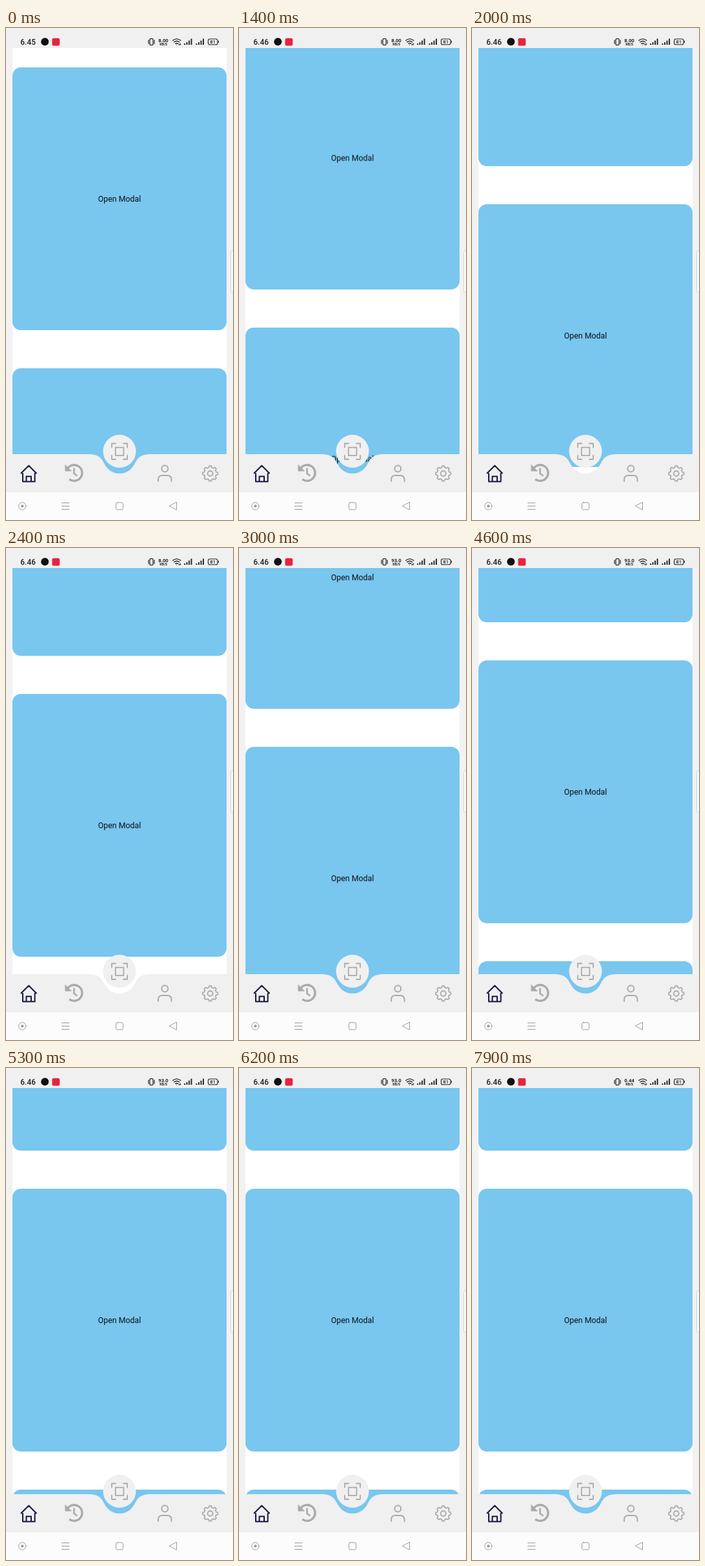
An HTML page for the animation above (8000 ms loop, 352x762 px).

```html
<!DOCTYPE html>
<html lang="en">
<head>
<meta charset="utf-8">
<title>Scrolling cards</title>
<style>
html, body { margin: 0; width: 100%; height: 100%; overflow: hidden; background: #f2f2f2; }
svg { display: block; width: 352px; height: 762px; font-family: Roboto, sans-serif; }
.line { fill: none; stroke-linecap: round; stroke-linejoin: round; }
.tab { stroke: #aaa; stroke-width: 2; }
.nav { stroke: #9b9b9b; stroke-width: 1; }
.label { font-size: 12.35px; text-anchor: middle; fill: #0b0f12; }
.clock { font-size: 12px; font-weight: 500; fill: #222; }
.rate { font-size: 7.7px; font-weight: 700; text-anchor: middle; fill: #222; }

#cards { animation: scroll 8s infinite linear; }
@keyframes scroll {
  0%, 13.75% { transform: translateY(0); animation-timing-function: cubic-bezier(.4, 0, .7, .6); }
  17.5% { transform: translateY(-63px); animation-timing-function: cubic-bezier(.3, .4, .6, 1); }
  30% { transform: translateY(-301px); animation-timing-function: cubic-bezier(.35, 0, .4, 1); }
  46.25%, 47.5% { transform: translateY(-165px); animation-timing-function: cubic-bezier(.3, .2, .6, .9); }
  57.5% { transform: translateY(113px); animation-timing-function: ease-out; }
  60%, 100% { transform: translateY(126px); }
}

/* Each status text is shown for one stretch of the loop. */
.swap { animation: 8s infinite step-end; }
#t1 { animation-name: t1; }
#t2 { animation-name: t2; }
#r1 { animation-name: r1; }
#r2 { animation-name: r2; }
#r3 { animation-name: r3; }
@keyframes t1 { 0% { opacity: 1 } 3.75%, 100% { opacity: 0 } }
@keyframes t2 { 0% { opacity: 0 } 3.75%, 100% { opacity: 1 } }
@keyframes r1 { 0% { opacity: 1 } 33.75%, 100% { opacity: 0 } }
@keyframes r2 { 0% { opacity: 0 } 33.75% { opacity: 1 } 81.25%, 100% { opacity: 0 } }
@keyframes r3 { 0% { opacity: 0 } 81.25%, 100% { opacity: 1 } }
</style>
</head>
<body>
<svg viewBox="0 0 352 762">
  <defs>
    <clipPath id="view"><rect x="10" y="31" width="332" height="689"/></clipPath>
    <g id="card">
      <rect x="10" y="61" width="332" height="407" rx="13" fill="#79c6ef"/>
      <text class="label" x="176" y="269.4">Open Modal</text>
    </g>
    <path id="bars" d="M1 26v-2M4.5 26v-4M8 26v-6.500M11.500 26v-9.500" stroke="#222" stroke-width="1.900"/>
  </defs>

  <rect width="352" height="762" fill="#f2f2f2"/>
  <g clip-path="url(#view)">
    <rect x="10" y="31" width="332" height="689" fill="#fff"/>
    <g id="cards">
      <use href="#card" y="-466"/>
      <use href="#card"/>
      <use href="#card" y="466"/>
      <use href="#card" y="932"/>
    </g>
  </g>

  <!-- status bar -->
  <rect width="352" height="31" fill="#f0f0f0"/>
  <text id="t1" class="clock swap" x="22.300" y="25.700">6.45</text>
  <text id="t2" class="clock swap" x="22.300" y="25.700">6.46</text>
  <circle cx="60.300" cy="21.300" r="6" fill="#111"/>
  <rect x="71.500" y="15.700" width="11.800" height="11.800" rx="2.500" fill="#e4253f"/>
  <g class="line" stroke="#222" stroke-width="1.200">
    <rect x="223" y="16.700" width="5" height="9.600" rx="1"/>
    <path d="M221 18.800v5.400M230 18.800v5.400"/>
    <path d="M258.700 19.300q6-4.800 12 0M260.700 21.800q4-3.200 8 0M262.700 24.200q2-1.500 4 0" stroke-width="1.400"/>
    <path d="M264.700 26v.1M268.500 24.500v2M270.500 24v2" stroke-width="1.200"/>
    <rect x="313.500" y="17" width="14.500" height="8.800" rx="2.600" stroke-width="1.100"/>
    <path d="M329.400 20.200v2.400"/>
  </g>
  <text id="r1" class="rate swap" x="244" y="21.500">8.00</text>
  <text id="r2" class="rate swap" x="244" y="21.500">93.0</text>
  <text id="r3" class="rate swap" x="244" y="21.500">0.44</text>
  <text class="rate" x="244" y="27" style="font-size:5.200px">KB/S</text>
  <use href="#bars" x="276"/>
  <use href="#bars" x="294.500"/>
  <text class="rate" x="320.800" y="24.100" style="font-size:7.400px;font-weight:500">81</text>

  <!-- tab bar -->
  <path fill="#f0f0f0" d="M0 660H126C143 660 147 665 152 674C157 684 165 690 176 690S195 684 200 674C205 665 209 660 226 660H352V720H0Z"/>
  <circle cx="176" cy="655.500" r="25.500" fill="#f0f0f0"/>
  <g class="line tab">
    <path stroke="#15153f" d="M23.500 689.500L35.300 677.800L47 689.500M26 690V702.500H44.700V690M31.500 702V694.500H39V702"/>
    <path d="M95 683A12.300 12.300 0 1 1 98.200 698.800" stroke-width="3.400" stroke-linecap="butt"/>
    <path d="M105.500 682.500V690L109.500 693" stroke-width="2.600"/>
    <path d="M92 677V686H101Z" fill="#aaa" stroke-width="1"/>
    <path d="M164 649.500V643.500H170M182 643.500H188V649.500M188 662V668H182M170 668H164V662" stroke-width="1.800"/>
    <rect x="169.800" y="649.700" width="12.600" height="12.400" stroke-width="1.800"/>
    <circle cx="246.300" cy="682.500" r="4.900"/>
    <path d="M236 702V699.500Q236 693 242.500 693H250Q256.500 693 256.500 699.500V702"/>
    <path id="gear" stroke-width="1.800"/>
    <circle cx="316.700" cy="690" r="4" stroke-width="1.800"/>
  </g>

  <!-- system navigation -->
  <rect y="719" width="352" height="43" fill="#fcfcfc"/>
  <g class="line nav">
    <circle cx="25.300" cy="740.500" r="5.700"/>
    <circle cx="25.300" cy="740.500" r="1.700" fill="#9b9b9b"/>
    <path d="M86.500 735.500H98M86.500 740.500H98M86.500 745.500H98"/>
    <rect x="170.500" y="735" width="11" height="11" rx="2.200"/>
    <path d="M264.500 734.700V746.300L253.500 740.500Z"/>
  </g>

  <!-- edge handle -->
  <rect x="348.500" y="345" width="6" height="64" rx="2" fill="#fafafa" stroke="#d4d4d4"/>
</svg>
<script>
// Eight rounded teeth around the gear's centre.
const points = Array.from({ length: 128 }, (_, i) => {
  const a = i * Math.PI / 64;
  const r = 10.6 + 1.2 * Math.tanh(2.5 * Math.cos(8 * a));
  return (316.7 + r * Math.cos(a)).toFixed(2) + ' ' + (690 + r * Math.sin(a)).toFixed(2);
});
document.getElementById('gear').setAttribute('d', 'M' + points.join('L') + 'Z');
</script>
</body>
</html>
```
